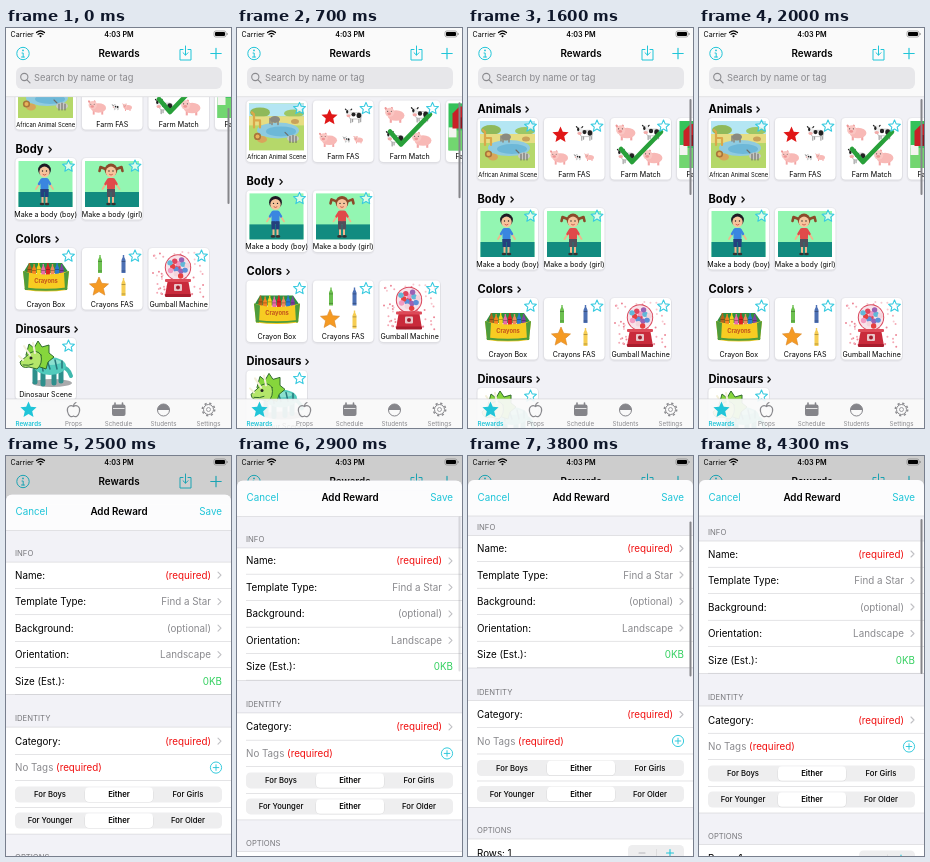
Recreate the animation shown at these times as an HTML page. Size 225 by 400 pixels, loop 4.4 s.

```html
<!DOCTYPE html>
<html lang="en">
<head>
<meta charset="utf-8">
<style>
html, body { margin: 0; width: 100%; height: 100%; overflow: hidden; background: #fff; }
svg { display: block; width: 225px; height: 400px; font-family: Inter, sans-serif; }
</style>
</head>
<body>
<svg id="stage" viewBox="0 0 225 400"></svg>
<script>
const CYAN = '#20c5d8', GRAY = '#8a8a8e', RED = '#f01010', LOOP = 4400;

// y is the vertical centre of the text
const text = (x, y, str, size, { fill = '#000', weight = 400, anchor = 'start' } = {}) =>
  `<text x="${x}" y="${y + size * 0.36}" font-size="${size}" fill="${fill}" font-weight="${weight}" text-anchor="${anchor}">${str}</text>`;
const rect = (x, y, w, h, fill, r = 0, extra = '') =>
  `<rect x="${x}" y="${y}" width="${w}" height="${h}" rx="${r}" fill="${fill}" ${extra}/>`;
const dot = (x, y, rx, fill, ry = rx) => `<ellipse cx="${x}" cy="${y}" rx="${rx}" ry="${ry}" fill="${fill}"/>`;
const line = (d, stroke, width = 1, fill = 'none') =>
  `<path d="${d}" fill="${fill}" stroke="${stroke}" stroke-width="${width}" stroke-linecap="round" stroke-linejoin="round"/>`;
const shape = (d, fill) => `<path d="${d}" fill="${fill}"/>`;
const ring = (x, y, r, stroke, width = 1) => `<circle cx="${x}" cy="${y}" r="${r}" fill="none" stroke="${stroke}" stroke-width="${width}"/>`;
const group = (x, y, body, scale = 1) => `<g transform="translate(${x} ${y}) scale(${scale})">${body}</g>`;
const plus = (x, y, r, width = 1) => line(`M${x - r} ${y}h${2 * r}M${x} ${y - r}v${2 * r}`, CYAN, width);
const chevron = (x, y) => line(`M${x} ${y - 3}l3 3l-3 3`, '#c0c0c4', 1.1);

function star(x, y, r, fill, stroke = 'none', width = 1) {
  const points = Array.from({ length: 10 }, (_, i) => {
    const a = (i / 5 - 0.5) * Math.PI, d = i % 2 ? r * 0.46 : r;
    return `${(x + d * Math.cos(a)).toFixed(2)},${(y + d * Math.sin(a)).toFixed(2)}`;
  });
  return `<polygon points="${points.join(' ')}" fill="${fill}" stroke="${stroke}" stroke-width="${width}" stroke-linejoin="round"/>`;
}

// Pictures are drawn in a 63 x 51 box at the card's top left corner.
const pig = (x, y, s = 1) => group(x, y,
  rect(-5, 2, 2, 6, '#f3a5a5') + rect(4, 2, 2, 6, '#f3a5a5') + dot(1, 1, 8, '#f8b9b6', 5) +
  line('M-9 -6l2 3M-3 -6l-1 3', '#ee9595', 2) + dot(-5, -2, 4.4, '#fac6c2') +
  dot(-5.5, -0.5, 1.8, '#ee9595', 1.3) + dot(-7, -3, 0.5, '#333') + dot(-3.5, -3, 0.5, '#333'), s);
const cow = (x, y, s = 1) => group(x, y,
  line('M-3 3v5M6 3v5M-1 3v4M8 3v4', '#999', 1.2) + rect(-5, -3, 14, 7, '#fff', 3, 'stroke="#888" stroke-width=".5"') +
  dot(0, -1, 2.3, '#222') + dot(6, 0, 2.6, '#222', 3) + line('M-9 -7l2 2M-2 -7l-2 2', '#222', 1.3) +
  dot(-5.5, -3, 3, '#eee', 4) + dot(-7, -4, 1.2, '#222', 2) + dot(-5.5, 0.5, 2.3, '#f3aaa8', 1.6), s);
const crayon = (x, y, h, color) =>
  shape(`M${x - 2} ${y + h}v${-h + 5}l1.3 -3v-2h1.4v2l1.3 3v${h - 5}z`, color) +
  rect(x - 2, y + 6, 4, 1, '#0004') + rect(x - 2, y + h - 2.5, 4, 1, '#0004');

const savanna = () => rect(4, 3, 55, 47, '#b5d86a') + rect(4, 3, 55, 13, '#b4e6f3') +
  dot(15, 12, 10, '#8fb95a', 5) + dot(49, 13, 10, '#9cc766', 4) + rect(4, 16, 55, 9, '#e6dd83') +
  dot(33, 30, 21, '#8fcbe0', 8) + dot(36, 31, 15, '#6db8d8', 5) +
  line('M9 27v-13l-2 -2M9 20h6v7', '#dba74a', 2.2) +
  dot(30, 19, 5, '#8b8a80', 3.5) + line('M27 20v4M33 20v4M25 18v5', '#8b8a80', 1.6) +
  dot(50, 21, 4, '#c9a25a', 2.5) + dot(17, 39, 5, '#d9a55b', 3.5) + dot(12.5, 36, 3.6, '#a9743a') +
  dot(12.5, 36, 2, '#e7b35b') + dot(48, 38, 6, '#c9c9c4', 3.5) + line('M45 36v6M48 35v7M51 36v6M43 35l-3 -3', '#6c6c68', 1.1);
const farmFas = () => star(18, 17, 8.5, '#e01717') + cow(42, 15, 0.9) + pig(17, 39, 0.95) + cow(35, 39, 0.35) + pig(47, 39, 0.5);
const farmMatch = () => pig(17, 14, 1.05) + cow(42, 14, 0.95) + cow(17, 38, 0.95) + pig(44, 39, 1.05) +
  line('M12 31L23 44L52 14', '#28a03a', 4.6);
const farmEdge = () => rect(4, 3, 55, 47, '#35c25a') + rect(4, 30, 55, 20, '#72d670') + rect(4, 27, 8, 10, '#f4f4f0') +
  shape('M8 13l7 -7h14l8 7v15h-29z', '#c82027') + rect(15, 17, 9, 11, '#8f151c');
const child = (shirt, pants, hair, girl) => rect(4.5, 3, 54, 46, '#93f6b2') + rect(4.5, 34, 54, 15, '#128b80') +
  (girl ? line('M25 11l-5 -2l-1 4M36 11l5 -2l1 4', hair, 2.6) : '') +
  line('M27 23l-5 8M34 23l5 8', '#f2b58b', 1.8) + line('M28.5 37v8M32.5 37v8', '#f2b58b', 2) +
  rect(26.5, 20, 8, 12, shirt, 2) + line('M27.5 22l-2.5 4M33.5 22l2.5 4', shirt, 2.4) +
  rect(26.5, 31, 3.7, 8, pants) + rect(30.8, 31, 3.7, 8, pants) + rect(26.5, 31, 8, 3, pants) +
  dot(30.5, 12, 6.4, hair) + dot(30.5, 14, 5.2, '#f6c49c', 5.4) +
  dot(28.5, 13, 0.7, '#222') + dot(32.5, 13, 0.7, '#222') + line('M29 16.5q1.5 1.4 3 0', '#b33', 0.7) +
  dot(28, 46, 2.3, '#333', 1.3) + dot(33, 46, 2.3, '#333', 1.3);
const crayonBox = () => {
  const colors = ['#b5651d', '#f58220', '#f5d21e', '#e86aa8', '#d22', '#f08a5a', '#2878d0', '#8040a0'];
  return shape('M9 25l6 -10h33l7 10z', '#2f8f3f') +
    colors.map((c, i) => crayon(15.5 + i * 4.6, 15 + i % 2, 15, c)).join('') +
    shape('M9 23q22 7 46 0l-2 19q-21 3 -42 0z', '#f7cc22') +
    shape('M9 23l6 2l-1 17l-3 0zM55 23l-5 2l1 17l2 0z', '#4e9c3c') + line('M11.5 40.500q20 2.500 41 0', '#4e9c3c', 1.8) +
    text(32, 33, 'Crayons', 5.8, { fill: '#c2521c', weight: 700, anchor: 'middle' });
};
const crayonsFas = () => crayon(19.5, 7, 18, '#6cc04f') + crayon(43, 7, 18, '#4c70b5') +
  star(18.5, 39, 10, '#f59a23', '#d88420', 0.6) + crayon(43, 30, 18, '#f6cd52');
const gumballs = () => {
  const noise = n => { const v = Math.sin(n * 12.9898) * 43758.5453; return v - Math.floor(v); };
  const palette = ['#e0455c', '#5b8fd8', '#f29ac0', '#9a62b5', '#e64040', '#62b8d8', '#f4d4dc'];
  const scatter = Array.from({ length: 75 }, (_, i) =>
    dot(6 + noise(i + 1) * 51, 4 + noise(i + 90) * 45, 1, ['#f5a9b5', '#f7c8cf', '#ed8797'][i % 3])).join('');
  const balls = Array.from({ length: 14 }, (_, i) => {
    const r = 10 * Math.sqrt(i / 14), a = i * 2.4;
    return dot(31 + r * Math.cos(a), 19.5 + r * Math.sin(a), 2.7, palette[i % 7]);
  }).join('');
  return scatter + dot(31, 19.5, 13.2, '#d9485c') + dot(31, 19.5, 12.2, '#f8e3ea') + balls +
    shape('M21 31h20l3 17h-26z', '#c92a3b') + rect(18, 31, 26, 3, '#dd4a58', 1) +
    rect(27, 36, 8, 7, '#e9c5c8', 1) + dot(31, 39.5, 2, '#a31b2b') + rect(18, 46, 26, 3, '#a81c2d', 1);
};
const dinosaur = () => dot(38, 45, 20, '#a9aaac', 4) + line('M46 28q9 2 11 10', '#3fb8ad', 4) +
  line('M21 32v12M29 35v11M40 34v11M47 31v12', '#2d8f8c', 5) + dot(36, 28, 16, '#52cbbd', 9) +
  dot(36, 24, 11, '#8be0cf', 3) + line('M33 22l3 9M41 22l2 9M48 23l0 7M28 26l1 7', '#27777b', 1.5) +
  line('M12 17L15 6l5 4 4 -7 4 6 7 -2 0 8 5 4 -6 5 -2 7 -9 -3z', '#2f6b2c', 1, '#86d63c') +
  line('M27 17q-4 -6 -11 -2L6 24q1 7 9 5l8 2q6 -5 4 -14z', '#2f6b2c', 1, '#b4e66a') +
  line('M16 17L10 8M21 15L19 5M9 22L5 18', '#f3efd8', 2) + dot(17, 20, 1.5, '#222') + line('M9 27q6 1 10 -1', '#2f6b2c', 1);

const card = (x, y, label, picture, size = 7.1) => group(x, y,
  rect(0, -1, 63, 65, '#00000008', 5) + rect(0.8, 0, 62, 62.8, '#0000000c', 4.5) + rect(1.5, 0, 60.5, 61.5, '#fff', 4) +
  picture() + star(54.5, 8.2, 6.2, '#ffffffb0', '#38cbe0', 1.1) + text(31.7, 56.5, label, size, { anchor: 'middle' }));

const sections = [
  ['Animals', 58, ['African Animal Scene', savanna, 5.8], ['Farm FAS', farmFas], ['Farm Match', farmMatch], ['Farm Puzzle', farmEdge]],
  ['Body', 43, ['Make a body (boy)', () => child('#3a86e0', '#24407e', '#1e1a24')],
    ['Make a body (girl)', () => child('#e04a4a', '#50505c', '#8b4a2a', true)]],
  ['Colors', 50, ['Crayon Box', crayonBox], ['Crayons FAS', crayonsFas], ['Gumball Machine', gumballs]],
  ['Dinosaurs', 69, ['Dinosaur Scene', dinosaur]]
];
const list = sections.map(([title, end, ...cards], i) => {
  const y = 81 + 90 * i;
  return text(9.5, y, title, 11.1, { weight: 700 }) + line(`M${end} ${y - 2}l2.3 2.5l-2.3 2.5`, '#111', 1.3) +
    cards.map(([label, picture, size], n) => card(8 + 66.5 * n, y + 9, label, picture, size)).join('');
}).join('');

const header = rect(0, 0, 225, 69, '#fafafa') + rect(0, 68.6, 225, 0.5, '#c8c8cc') +
  text(113, 25.5, 'Rewards', 9.9, { weight: 600, anchor: 'middle' }) +
  ring(17, 25.5, 6.2, CYAN) + dot(17, 22.4, 0.9, CYAN) + line('M16 25h1.2v4M15.5 29h3', CYAN) +
  line('M177 21.5h-3v10.5h11v-10.5h-3M179.5 18v9M177 24.7l2.5 2.5l2.5 -2.5', CYAN) + plus(210, 25.5, 5.2, 1.2) +
  rect(10, 39, 206, 22, '#e7e7ea', 6) + ring(18.3, 49, 3.6, GRAY, 1.1) + line('M21 51.8l3 3', GRAY, 1.2) +
  text(28, 50, 'Search by name or tag', 9.3, { fill: GRAY });

const status = text(4.5, 6, 'Carrier', 7.1) + text(113, 6, '4:03 PM', 7.2, { weight: 600, anchor: 'middle' }) +
  line('M30.5 4.5q4 -3.4 8 0M32 6.4q2.5 -2 5 0', '#000', 1.2) + dot(34.5, 8.2, 1, '#000') +
  rect(208, 3, 12, 6, 'none', 1.8, 'stroke="#777" stroke-width=".6"') + rect(209, 4, 10, 4, '#000', 1) + rect(220.7, 5, 0.8, 2, '#777');

const tabIcons = [
  star(22.5, 382, 8.5, CYAN),
  line('M67.5 378.5c-3 -2 -7 0 -6 5c1 5 4 6 6 4.5c2 1.5 5 .5 6 -4.5c1 -5 -3 -7 -6 -5q0 -3 2.5 -4', GRAY, 1.2),
  rect(106, 376.5, 13.5, 11.5, '#85858a', 2) + rect(107, 380.2, 11.5, 0.8, '#fafafa') + line('M109 375v2.5M116.5 375v2.5', '#85858a', 1.6),
  ring(157.5, 382, 6, '#85858a') + shape('M151.5 382a6 6 0 0 1 12 0z', '#85858a'),
  ring(202.5, 381.5, 5, GRAY) + ring(202.5, 381.5, 2, GRAY, 0.8) +
    `<circle cx="202.5" cy="381.5" r="6.2" fill="none" stroke="${GRAY}" stroke-width="1.5" stroke-dasharray="2.2 2.67"/>`
];
const tabBar = rect(0, 371, 225, 29, '#fafafa', 0, 'opacity=".93"') + rect(0, 370.7, 225, 0.5, '#c8c8cc') +
  ['Rewards', 'Props', 'Schedule', 'Students', 'Settings'].map((name, i) => tabIcons[i] +
    text(22.5 + 45 * i, 395.5, name, 6.2, { fill: i ? GRAY : CYAN, weight: i ? 400 : 600, anchor: 'middle' })).join('');

// The sheet's coordinates start at its own top edge.
const separator = (y, x = 0) => rect(x, y - 0.25, 225 - x, 0.5, '#c8c8cc');
const formSection = (title, y, height) => text(9, y, title, 7.7, { fill: '#77777b' }) +
  rect(0, y + 8.5, 225, height, '#fff') + separator(y + 8.5) + separator(y + 8.5 + height);
const formRow = (y, label, value, fill = GRAY, linked = true) => text(9, y, label, 9.8) +
  text(linked ? 205 : 216, y, value, 9.8, { fill, anchor: 'end' }) + (linked ? chevron(212, y) : '') + separator(y + 13.2, 9);
const segments = (y, left, right) => rect(9, y - 8, 207, 16, '#eeeeef', 4.5) +
  rect(78.5, y - 7, 69, 15, '#00000014', 4.5) + rect(79, y - 7.3, 68, 14.6, '#fff', 4) +
  [left, 'Either', right].map((s, i) => text(44 + 69 * i, y, s, 7.7, { weight: i === 1 ? 600 : 500, anchor: 'middle' })).join('');

const form = formSection('INFO', 59, 132.5) +
  formRow(80.5, 'Name:', '(required)', RED) + formRow(107, 'Template Type:', 'Find a Star') +
  formRow(133.5, 'Background:', '(optional)') + formRow(160, 'Orientation:', 'Landscape') +
  formRow(186.5, 'Size (Est.):', '0KB', '#34d060', false) +
  formSection('IDENTITY', 224, 107) + formRow(246.5, 'Category:', '(required)', RED) +
  text(9, 273, `No Tags <tspan fill="${RED}">(required)</tspan>`, 9.8, { fill: GRAY }) + separator(286, 9) +
  ring(210, 273, 5.6, CYAN, 0.9) + plus(210, 273, 2.8, 0.9) +
  segments(300, 'For Boys', 'For Girls') + separator(313, 9) + segments(326, 'For Younger', 'For Older') +
  formSection('OPTIONS', 362.5, 120) + text(9, 385, 'Rows: 1', 9.8) +
  rect(160, 377, 56, 16, '#eeeeef', 4.5) + line('M171 385h6', '#b8b8bc', 1.1) + rect(188, 381, 0.5, 8, '#ccc') + plus(202, 385, 3.5, 1.1);
const sheetHeader = rect(0, 0, 225, 36, '#fcfcfd', 6) + rect(0, 10, 225, 26, '#fcfcfd') + separator(36) +
  text(9.5, 17, 'Cancel', 9.8, { fill: CYAN }) + text(113, 17, 'Add Reward', 9.8, { weight: 600, anchor: 'middle' }) +
  text(216, 17, 'Save', 9.8, { fill: CYAN, anchor: 'end' });

const stage = document.getElementById('stage');
stage.innerHTML = `<clipPath id="sheetClip">${rect(0, 0, 225, 450, '#000', 6)}</clipPath>` +
  rect(0, 0, 225, 400, '#f1f1f6') + `<g id="list">${list}</g>` +
  rect(221.5, 0, 2, 96, '#85858a', 1, 'id="listBar"') + header + tabBar +
  rect(0, 0, 225, 400, '#000', 0, 'id="dim"') +
  `<g id="sheet" clip-path="url(#sheetClip)">${rect(0, 0, 225, 450, '#f2f2f7')}<g id="form">${form}</g>${sheetHeader}` +
  rect(221.5, 0, 2, 155, '#85858a', 1, 'id="formBar"') + '</g>' + status;

const part = id => document.getElementById(id);
const moveY = (id, y) => part(id).setAttribute('transform', `translate(0 ${y.toFixed(2)})`);
const ease = (t, from, to) => {
  const p = Math.min(1, Math.max(0, (t - from) / (to - from)));
  return p * p * (3 - 2 * p);
};

function draw(t) {
  const scroll = 50 * Math.max(0, 1 - t / 1500) ** 1.66;
  moveY('list', -scroll);
  moveY('listBar', 71 + scroll * 0.18);

  // Critically damped spring carries the sheet up.
  const s = Math.max(0, t - 2000) * 0.0101;
  const remaining = (1 + s) * Math.exp(-s);
  moveY('sheet', 24 + 376 * remaining);
  part('dim').setAttribute('opacity', 0.18 * (1 - remaining));

  const formScroll = 15 * ease(t, 2900, 3400) - 8.5 * ease(t, 3500, 4250);
  moveY('form', -formScroll);
  moveY('formBar', 36 + formScroll * 0.46);
  part('formBar').setAttribute('opacity', ease(t, 2850, 3000));
}

const start = performance.now();
function tick() {
  const t = (performance.now() - start) % LOOP;
  draw(Math.floor(t / 100) * 100);
  requestAnimationFrame(tick);
}
tick();
</script>
</body>
</html>
```
